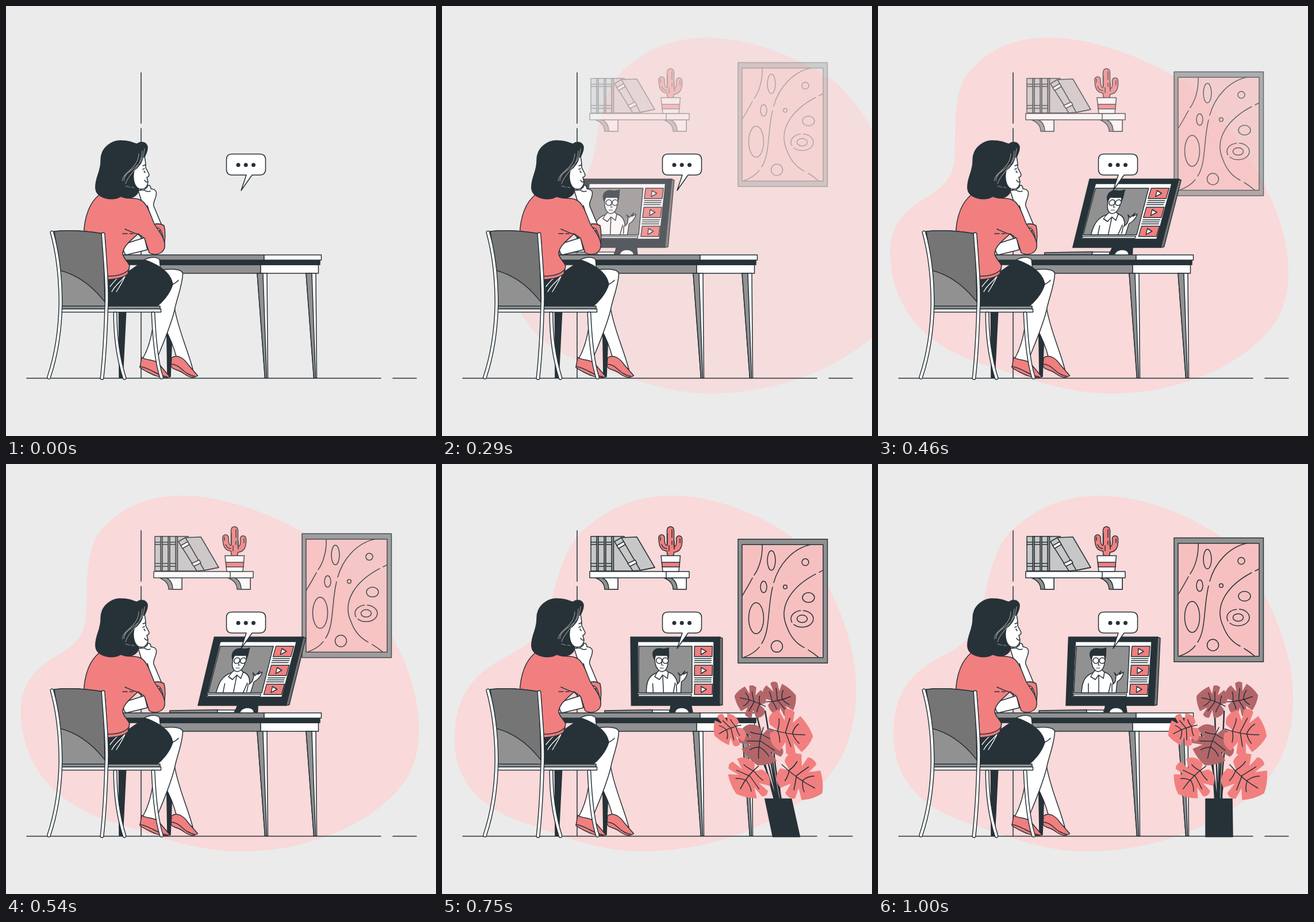
An HTML page that plays this animation: 748x748 px, repeating every 1040 ms.

```html
<!DOCTYPE html>
<html lang="en">
<head>
<meta charset="utf-8">
<title>Online lesson</title>
<style>
html, body { margin: 0; width: 100%; height: 100%; overflow: hidden; background: #ebebeb; }
svg { display: block; width: 100vw; height: 100vh; fill: none; stroke: #263238; stroke-width: 1.5; stroke-linecap: round; stroke-linejoin: round; }
.w { fill: #fff; }
.c { fill: #f17f7f; }
.k { fill: #263238; }
.g { fill: #919191; }
.l { fill: #c7c7c7; }
.d { fill: #757575; }
.n { stroke: none; }
.hair { stroke: #919191; stroke-width: 1.2; }
.shine { stroke: #fff; stroke-width: 1.3; }
</style>
</head>
<body>
<svg viewBox="0 0 748 748">
  <defs>
    <path id="tubes" d="M80 394C90 430 95 470 95 518C94 570 86 612 74.500 646M169 397C172 440 177 490 174.500 530C173 580 170 620 167 647M190 535C190 580 196 615 206 647M256 535C258 580 262 620 270.500 646"/>
    <path id="arms" d="M382 128C382 146 387 147 397 147M412.500 130C414 148 407 149 398 149"/>
  </defs>

  <path id="blob" class="n" fill="#f9d9d9" d="M385 55C470 55 560 98 612 138C655 185 722 300 722 405C722 470 706 510 680 545C645 590 530 674 360 674C290 674 215 645 165 627C90 605 27 560 27 470C27 398 58 364 105 338C148 316 166 299 176 270C190 225 195 140 244 106C284 72 330 55 385 55Z"/>

  <path d="M235 116V204M235 213V647M36 647.500H652M673 647.500H714"/>

  <g id="shelf">
    <g id="bracket">
      <path class="g" d="M267 198C277 202 283 208 283 218H306V198Z"/>
      <path class="w" d="M279 198C287 202 290 208 290 218H306V198Z"/>
    </g>
    <use href="#bracket" x="119"/>
    <path class="w" d="M257 187H430V198H257ZM390 187V198"/>
    <path class="l" d="M298 126H317L338 186H298Z"/>
    <g id="book">
      <path class="l" d="M259 126H272V186H259Z"/>
      <path class="g" d="M269 126H272.500V186H269Z"/>
      <path d="M259 136H269M259 140H269M259 173H269M259 178H269"/>
    </g>
    <use href="#book" x="13"/>
    <use href="#book" x="26"/>
    <path class="l" d="M312 128L339 127L370 180L345 185L332 186L300 135Z"/>
    <path d="M312 128L345 185M370 180L346 185"/>
    <path class="w" d="M304 142L316 135L319 140L307 147ZM323 173L336 167L339 172L327 178Z"/>
    <path stroke-width="13.500" d="M397.500 155V115"/>
    <use href="#arms" stroke-width="11.500"/>
    <g stroke="#f17f7f">
      <path stroke-width="10.500" d="M397.500 155V115"/>
      <use href="#arms" stroke-width="8.500"/>
    </g>
    <path d="M400 114V128M400 134V140M395 142V151M380 127V133M382 140C384 145 387 147 391 147M414 130V137M392 121V140M404 134V148"/>
    <path class="w" d="M381 159.500H414.500L412 187H384Z"/>
    <path class="c" d="M382.500 171H413.500L413 179H383Z"/>
  </g>

  <g id="painting">
    <path class="g" d="M515 128.500H670.500V344H515Z"/>
    <path fill="#f7c0c0" d="M522 138H663V334.500H522Z"/>
    <path d="M557 138C558 160 551 180 543 191M540 196C534 207 528 218 522 227M641 138C610 145 586 172 577 204M575 212C566 248 571 288 556 310M552 316C545 325 536 330 525 334M662 183L656 186M650 189C608 211 584 246 600 281C607 301 618 311 630 317M637 321Q647 327 655 334"/>
    <ellipse cx="573" cy="165.500" rx="7" ry="17"/>
    <ellipse cx="559.500" cy="211.500" rx="5.500" ry="10"/>
    <ellipse cx="546.500" cy="266" rx="13" ry="27"/>
    <circle cx="632" cy="168.500" r="6"/>
    <circle cx="597" cy="211.500" r="3.300"/>
    <ellipse cx="637.500" cy="230" rx="10.500" ry="8.500"/>
    <ellipse cx="626.500" cy="267" rx="19.500" ry="14.500" stroke-dasharray="42 5 30 5"/>
    <ellipse cx="626.500" cy="267" rx="9" ry="6.500"/>
    <circle cx="582.500" cy="315" r="10"/>
  </g>

  <g id="screen">
    <path class="g" d="M280 429L363 427.500V432.500H280Z"/>
    <path class="w" d="M363 428H393V432.500H363Z"/>
    <path class="k" d="M396 419H431L433 432H393Z"/>
    <path class="w n" d="M403 432.500C403 422 425 422 426 432.500Z"/>
    <path class="d" d="M486 301L491 303L485.500 419L480 420Z"/>
    <path class="k" d="M331.500 301H486.500L480 420H327Z"/>
    <path class="w" d="M343.500 309H476L470 405.500H338.500Z"/>
    <path class="g" d="M345 317H437.500L433.500 398H340.500Z"/>
    <path class="w" stroke-width="1.300" d="M340 400.500H432.500L432 404H340Z"/>
    <g id="clip">
      <path class="c" d="M442 317H473L471.500 335H440.500Z"/>
      <path class="w" d="M453 321L462 326L452.500 331.500Z"/>
    </g>
    <use href="#clip" x="-1.500" y="33"/>
    <use href="#clip" x="-3" y="66"/>
    <path stroke-width="1.300" d="M441 338.500H470M440.500 342H470M440 345.500H469M439 372H469M439 375.500H468M438 379H468"/>
    <path class="w" d="M354 398C355 383 357 369 374 363L379 358H389L394 362C404 365 408 372 409 383L413 378L414 369L411 363L416 368L423 360L420 366L427 362Q427 368 421 375L416 379L414 398Z"/>
    <path d="M374 363L370 370L378 375L384 367L392 373L394 362M384 369V398M366 382V398M405 381L401 398M407 383V396"/>
    <path class="w" d="M371 333L372 347C373 355 379 362 384 361C391 360 394 351 394 345L396 333Z"/>
    <path class="k" d="M371 340C365 327 372 320 382 321Q389 323 397 320C395 324 398 329 395 338L393 331C387 334 380 332 374 331Z"/>
    <circle class="w" cx="379" cy="342" r="5"/><circle class="w" cx="390" cy="342" r="5"/>
    <path d="M384 342L383 350H386M380 355H386" stroke-width="1.200"/>
  </g>

  <g id="desk">
    <path class="k" d="M196 465H212L203 647H197ZM278 465H293L286 645H281Z"/>
    <path class="g" d="M260 450H443V465H260Z"/>
    <path class="w" d="M443 450H543.500V465H443Z"/>
    <path class="k" d="M203 442H546V450H203Z"/>
    <path class="g" d="M203 433H449V442H203Z"/>
    <path class="w" d="M449 433H548.500V442H449Z"/>
    <g id="leg">
      <path class="w" d="M437 465H454L455.500 647H450.500Z"/>
      <path class="g" d="M437 465H447L453.500 647H450.500Z"/>
    </g>
    <use href="#leg" x="85"/>
  </g>

  <g id="woman">
    <path class="w" d="M267 528L293 524C299 562 316 597 325 632L297 613C292 593 284 574 275 558Z"/>
    <path class="c" d="M288 612C297 605 309 612 317 624L333.500 643Q324 650 310 640C300 631 288 634 287 625Z"/>
    <path d="M287 623C304 623 308 641 328 644"/>
    <path class="w" d="M240 442C252 435 264 437 267 441L269 460Z"/>
    <path class="w" d="M266 460C282 457 305 456 307.500 465C307 487 297 508 293 530C284 565 270 594 259 622L238 613C250 592 257 563 258 525Z"/>
    <path d="M282 489C287 484 294 484 300 477"/>
    <path class="c" d="M236 611C245 618 259 613 268 625L285 645C273 650 251 641 233 629Z"/>
    <path d="M233 627C250 629 263 643 280 645"/>
    <path class="k" d="M177 476L213 462L242 442C262 449 286 462 290 484C285 501 271 516 262 523H177Z"/>
    <path class="shine" d="M211 463C205 477 192 482 184 497M207 470C203 480 198 487 192 497M199 470C192 474 187 480 181 488"/>

    <path class="w" d="M230 321L240 320L246 315C246 309 252 312 252 318C260 319 263 322 261 330C260 337 255 342 257 348L272 384L257 396L236 340Z"/>
    <path d="M240 320Q245 324 251 322M246 347L252 368"/>
    <path class="c" d="M257 380Q267 377 275 382Q279 398 274 424L262 405Z"/>
    <path class="w" d="M263 386C269 385 274 400 274 409C268 407 261 397 263 386ZM267 390L272 403M264 394L271 406"/>
    <path class="w" d="M206 414L241 403L246 424L209 433C204 430 203 420 206 414Z"/>
    <path class="c" d="M164 327C144 342 136 370 135 400L172 402L177 476C192 475 204 473 212 466L215 452C212 444 206 442 203 432C202 419 218 407 230 396L241 404L249 429C256 434 270 433 275 423C281 407 264 390 258 379C251 363 246 344 235 338C222 331 216 338 199 331Z"/>
    <path d="M207 388C216 392 224 396 230 397M203 396H211M215 396H221M178 470C195 470 207 466 214 458M230 397L237 404"/>

    <path class="k" d="M156 318C154 300 166 288 165 268C165 246 185 233 202 234.500C215 234 222 239 228 240C234 235 244 236 246 245C247 254 240 262 238 271L225 290L231 318C230 331 217 338 200 331C186 340 158 335 156 318Z"/>
    <path class="w" d="M241 262C243 270 243 276 243 281L249 293Q249 297 245 298L247 306C246 316 240 320 231 318C222 313 220 298 223 286C231 280 237 271 238 264Z"/>
    <path d="M238 284L241 283M240 287L242 290M241 303Q243 307 246 306M238 278L243 276"/>
    <path class="hair" d="M241 248C238 287 207 281 205 304M231 257C230 283 204 288 202 304M237 252C236 282 214 289 208 309M208 313L215 315M218 315L223 316"/>
  </g>

  <g id="chair">
    <path class="g" d="M84 392C113 389 145 392 169 396L174 523H96Z"/>
    <path class="d" d="M84 392C113 389 145 392 169 396L172 515C152 489 125 468 94 460Z"/>
    <path class="g" d="M95 522H268V527H95Z"/>
    <path class="w" d="M93 527H269.500V532.500H93Z"/>
    <use href="#tubes" stroke-width="7"/>
    <use href="#tubes" stroke="#fff" stroke-width="4.100"/>
  </g>

  <g id="bubble">
    <path class="w" d="M393 257.500H441Q451.500 257.500 451.500 267V284Q451.500 294 441 294H428L409 321L418 294H393Q383.500 294 383.500 284V267Q383.500 257.500 393 257.500Z"/>
    <path stroke-width="7" d="M404 276.500h0M417.200 276.500h0M430.500 276.500h0"/>
  </g>

  <g id="plant">
    <path stroke-width="2.500" d="M588 583C587 540 577 500 562 470M591 583C590 545 588 510 586 440M594 583C594 530 600 500 602 430M597 583C598 540 600 510 606 478M589 583C588 560 584 546 575 542M598 583C598 562 601 550 608 545M586 583L582 510M592 583L594 500"/>
    <g id="leaves"></g>
    <path class="k" d="M570 582.500H616L617 648.500H570Z"/>
  </g>
</svg>
<script>
const $ = id => document.getElementById(id);
const clamp = v => Math.max(0, Math.min(1, v));
const mix = (a, b, p) => a + (b - a) * p;

// A split leaf: lobes round a centre with wedge-shaped cuts, a midrib and side veins.
function leaf(color, x, y, r, turn) {
  const at = (deg, f) => {
    const a = deg * Math.PI / 180, len = r * f;
    return (len * Math.cos(a)).toFixed(1) + ' ' + (len * Math.sin(a)).toFixed(1);
  };
  let edge = `M${at(180, 0.45)}L${at(-166, 0.8)}Q${at(-145, 1.15)} ${at(-112, 1)}`;
  for (const a of [-104, -63, 63, 104]) {
    const next = a === -63 ? 55 : a === 104 ? 166 : a + 33;
    edge += `L${at(a, 0.5)}L${at(a + 8, 1)}`;
    edge += a === -63 ? `Q${at(-25, 1.05)} ${at(0, 1.1)}Q${at(25, 1.05)} ${at(next, 1)}`
      : `Q${at((a + 8 + next) / 2, 1.13)} ${at(next, a === 104 ? 0.8 : 1)}`;
  }
  let veins = `M${-r * 0.8} 0Q0 ${r * 0.14} ${r * 0.75} 0`;
  for (const side of [-1, 1])
    for (const [from, deg] of [[-0.45, 125], [-0.1, 80], [0.2, 42]])
      veins += `M${r * from} 1Q${r * (from + 0.1)} ${side * r * 0.3} ${at(side * deg, 0.65)}`;
  return `<g transform="translate(${x} ${y}) rotate(${turn})"><path class="n" fill="${color}" d="${edge}Z"/><path d="${veins}"/></g>`;
}
const dark = '#b3666a', coral = '#f17f7f';
$('leaves').innerHTML = [
  [dark, 583, 414, 28, 200], [dark, 630, 409, 29, -12], [dark, 583, 486, 37, 110],
  [coral, 534, 462, 28, 160], [coral, 634, 466, 39, 10], [coral, 550, 546, 36, 135], [coral, 637, 544, 41, 40]
].map(l => leaf(...l)).join('');

// cubic-bezier(.36, -.01, .5, 1.38)
function ease(x) {
  const curve = (s, a, b) => 3 * (1 - s) * s * ((1 - s) * a + s * b) + s ** 3;
  let lo = 0, hi = 1;
  for (let i = 0; i < 24; i++) {
    const mid = (lo + hi) / 2;
    if (curve(mid, 0.36, 0.5) < x) lo = mid; else hi = mid;
  }
  return curve(lo, -0.01, 1.38);
}

// Rush in from one side (-1 right, 1 left), then lean back and settle.
function rush(id, p, side, originY) {
  p = clamp(p);
  let lean, shift = 0, alpha = 1;
  if (p < 0.6) {
    const e = ease(p / 0.6);
    lean = mix(0.364, -0.176, e);
    shift = -374 * (1 - e);
    alpha = clamp(e);
  } else if (p < 0.8) lean = mix(-0.176, 0.035, ease((p - 0.6) / 0.2));
  else lean = mix(0.035, 0, ease((p - 0.8) / 0.2));
  lean *= side;
  $(id).setAttribute('transform', `matrix(1 0 ${lean} 1 ${shift * side - lean * originY} 0)`);
  $(id).setAttribute('opacity', alpha);
}

function draw(now) {
  const tick = Math.min(24, Math.floor((now % 1040 + 5) * 0.024));
  const t = tick ? Math.min(1, tick / 24 + 0.013) : 0;
  const e = t < 1 ? ease(t) : 1;
  rush('blob', t, -1, 370);
  rush('screen', t, 1, 370);
  rush('plant', (t - 0.497) / 0.5, -1, 516);
  $('shelf').setAttribute('opacity', clamp(e));
  $('painting').setAttribute('opacity', clamp(e));
  $('painting').setAttribute('transform', `translate(0 ${-44.9 * (1 - e)})`);
  requestAnimationFrame(draw);
}
draw(0);
</script>
</body>
</html>
```
